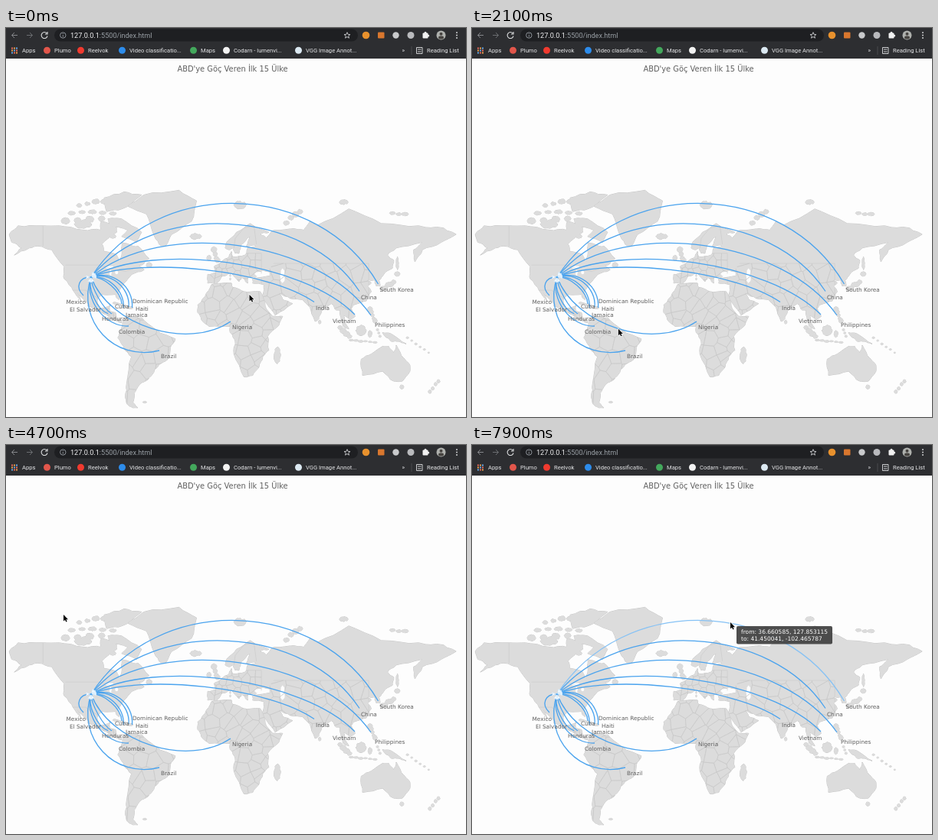
An HTML page with a canvas for the animation above (8 s loop, 600 by 509 pixels).

```html
<!DOCTYPE html>
<html lang="tr">
<head>
<meta charset="utf-8">
<style>
html, body { margin: 0; width: 100%; height: 100%; overflow: hidden; background: #fdfdfd; }
canvas { display: block; width: 600px; height: 509px; }
</style>
</head>
<body>
<canvas id="stage" width="600" height="509"></canvas>
<script>
const W = 600, H = 509, LOOP = 8000, STEP = 100;
const PAPER = '#fdfdfd', LAND = '#dcdcdc', EDGE = '#c5c5c5', BLUE = '#4aa3ee', PALE = '#86c2f5';
const MAP_FONT = '"DejaVu Sans", Verdana, sans-serif', UI_FONT = 'Roboto, sans-serif';
const HUB = { x: 111, y: 326 };
const ctx = document.getElementById('stage').getContext('2d');
const backdrop = document.createElement('canvas');
backdrop.width = W;
backdrop.height = H;
const bg = backdrop.getContext('2d');

function text(c, str, x, y, size, color, font = MAP_FONT, align = 'left') {
  c.font = `${size}px ${font}`;
  c.fillStyle = color;
  c.textAlign = align;
  c.fillText(str, x, y);
}
function disc(c, x, y, r, color) {
  c.fillStyle = color;
  c.beginPath();
  c.arc(x, y, r, 0, 7);
  c.fill();
}
function box(c, x, y, w, h, r, color) {
  c.fillStyle = color;
  c.beginPath();
  c.roundRect(x, y, w, h, r);
  c.fill();
}
function line(c, d, color, width = 1) {
  c.strokeStyle = color;
  c.lineWidth = width;
  c.stroke(new Path2D(d));
}

// Miller projection
function project([lon, lat]) {
  const y = 1.25 * Math.log(Math.tan(Math.PI / 4 + lat * Math.PI / 450)) * 180 / Math.PI;
  return [277.8 + lon * 1.628, 397 - y * 1.628];
}
const parse = s => s.split(',').map(p => p.split(' ').map(Number));
const hash = (a, b) => {
  const v = Math.sin(a * 12.99 + b * 78.23) * 43758.5;
  return v - Math.floor(v) - 0.5;
};
// Splits every coast edge at a randomly shifted midpoint.
const roughen = points => points.flatMap((p, i) => {
  const q = points[(i + 1) % points.length];
  const amp = Math.min(Math.hypot(q[0] - p[0], q[1] - p[1]) * 0.3, 1.4);
  const mx = (p[0] + q[0]) / 2, my = (p[1] + q[1]) / 2;
  return [p, [mx + hash(mx, my) * amp, my + hash(my, mx) * amp * 0.7]];
});
function outline(points, closed = true) {
  const path = new Path2D();
  points.map(project).forEach(([x, y]) => path.lineTo(x, y));
  if (closed) path.closePath();
  return path;
}
const coast = points => outline(roughen(roughen(points)));

const lands = [];
function land(points) {
  const path = coast(parse(points));
  lands.push(path);
  return path;
}
const blob = (lon, lat, rx, ry) => coast(Array.from({ length: 8 }, (_, i) =>
  [lon + rx * Math.cos(i * Math.PI / 4), lat + ry * Math.sin(i * Math.PI / 4)]));
const isle = (...shape) => lands.push(blob(...shape));
function isles(lon0, lat0, lon1, lat1, count, rx, ry) {
  for (let i = 0; i < count; i++) {
    const u = i / (count - 1), size = 1 + hash(i, lon0) * 0.5;
    isle(lon0 + (lon1 - lon0) * u, lat0 + (lat1 - lat0) * u + hash(lat0, i) * ry, rx * size, ry * size);
  }
}

// Keeps the part of a polygon that is nearer to a than to b.
function nearer(poly, a, b) {
  const side = p => (p[0] - a[0]) ** 2 + (p[1] - a[1]) ** 2 - (p[0] - b[0]) ** 2 - (p[1] - b[1]) ** 2;
  return poly.flatMap((p, i) => {
    const q = poly[(i + 1) % poly.length], sp = side(p), sq = side(q), u = sp / (sp - sq);
    const kept = sp <= 0 ? [p] : [];
    if (sp * sq < 0) kept.push([p[0] + (q[0] - p[0]) * u, p[1] + (q[1] - p[1]) * u]);
    return kept;
  });
}
// Divides part of a landmass into random Voronoi countries.
function countries(path, west, south, east, north, size) {
  const sites = [];
  for (let lon = west; lon < east; lon += size)
    for (let lat = south; lat < north; lat += size)
      sites.push([lon + size * (0.5 + hash(lon, lat) * 0.9), lat + size * (0.5 + hash(lat, lon) * 0.9)]);
  const frame = [[west, south], [east, south], [east, north], [west, north]];
  bg.save();
  bg.clip(path);
  for (const a of sites) {
    const cell = sites.reduce((poly, b) => b === a ? poly : nearer(poly, a, b), frame);
    bg.stroke(outline(cell));
  }
  bg.restore();
}

function drawMap() {
  const northAmerica = land('-168 66,-161 70,-141 70,-128 70,-108 68,-95 68,-94 72,-82 69,-82 67,-94 61,-92 57,-82 55,-79 51,-78 58,-78 62,-69 60,-65 60,-56 53,-60 50,-70 47,-65 49,-60 46,-70 43,-76 37,-81 31,-80 25,-83 29,-94 29,-97 26,-97 20,-95 18,-91 19,-87 21,-88 16,-83 15,-83 10,-78 9,-78 7,-86 10,-92 14,-105 20,-106 23,-114 31,-110 23,-117 32,-124 40,-124 48,-134 58,-145 60,-152 59,-164 55,-158 59,-166 62');
  const southAmerica = land('-77 8,-72 12,-62 11,-50 1,-35 -6,-39 -13,-41 -22,-48 -26,-54 -34,-57 -37,-62 -39,-65 -42,-68 -46,-69 -52,-65 -55,-72 -54,-75 -49,-74 -40,-70 -20,-76 -14,-81 -5,-78 3');
  const africa = land('-6 36,10 37,11 34,20 31,33 31,37 20,43 12,51 12,48 5,39 -4,40 -15,35 -20,32 -28,27 -34,20 -35,12 -18,13 -8,9 -1,9 4,-8 4,-13 8,-17 15,-17 21,-10 30');
  const europe = land('60 68.5,44 68,38 64,33 66,40 67,25 71,14 67,6 62,5 59,8 58,11 59,13 56,16 56,18 61,25 65,22 60,30 60,23 59,21 55,11 54,10 57,8 54,2 51,-4 48,-2 44,-9 43,-9 37,-2 37,3 42,10 44,16 38,18 40,13 45,20 40,23 37,23 41,29 41,36 45,62 44');
  const asia = land('58 68.5,68 68,73 72,78 70,104 77,130 71,160 70,180 69,190 66,178 62,163 58,157 51,156 58,163 62,142 59,135 55,140 52,139 47,132 43,128 39,129 35,126 35,125 39,118 39,122 37,119 35,122 31,118 24,108 21,106 18,109 12,105 9,100 13,100 7,104 2,101 3,98 9,97 17,94 17,90 22,82 16,80 10,77 8,73 19,67 25,57 26,48 30,51 25,59 22,45 13,39 21,35 28,36 36,27 37,27 40,41 42,40 46');
  land('114 -22,115 -34,131 -31,140 -38,147 -38,153 -31,152 -25,146 -19,142 -11,140 -17,136 -12,131 -12,122 -18');
  land('-73 78,-60 82,-32 83.5,-18 80,-22 72,-38 66,-43 60,-48 61,-53 67,-58 75');
  land('-89 73,-78 73,-62 67,-66 62,-78 65,-73 68,-88 70');
  land('-90 76,-78 77,-62 82,-76 83,-92 81');
  land('131 -1,138 -2,150 -10,144 -8,138 -8,133 -4');
  // Arctic and Atlantic
  isles(-123, 72.7, -94, 73, 4, 3, 1.2);
  isles(-118, 75.7, -85, 75.4, 5, 3.5, 0.8);
  isles(-112, 78.5, -92, 80, 4, 2.8, 0.8);
  isle(-109, 70.7, 7, 1.8);
  isle(-85, 65, 2.5, 1);
  isle(-56, 49, 2.3, 1.6);
  isle(-18.7, 65, 4.7, 1.4);
  isle(17, 78.5, 5, 1.4);
  isles(54, 71.5, 65, 76, 4, 2.5, 1);
  isle(100, 79.5, 3.5, 0.9);
  isles(139, 75.2, 149, 75, 3, 2.5, 0.6);
  isles(-83.5, 22.3, -75.5, 20.4, 5, 1.3, 0.6);
  isle(-71.3, 18.8, 2.6, 0.8);
  isle(-59.5, -51.7, 1.6, 0.5);
  // Europe and the Indian Ocean
  isles(-1.2, 51.8, -4, 57.5, 4, 2.2, 1.6);
  isle(-8, 53.3, 1.8, 1.6);
  isles(9, 42, 9, 40, 2, 0.6, 0.9);
  isle(46.8, -19, 2.6, 6.5);
  isle(80.7, 7.5, 1, 1.5);
  // Pacific
  isle(143, 50, 0.9, 4);
  isle(142.8, 43.3, 2.2, 1.5);
  isles(131, 33, 140, 38, 5, 1.8, 1.4);
  isles(121, 17, 125, 8, 5, 1.6, 1.6);
  isle(113.8, 0.8, 4.2, 4.2);
  isles(97, 4, 104.5, -4, 4, 2.3, 1.8);
  isles(106, -6.8, 125, -9, 6, 2, 0.7);
  isle(121, -2, 1.6, 2.7);
  isles(127, 1, 129, -3.5, 3, 0.9, 0.8);
  isles(151, -5, 168, -17, 6, 0.9, 0.6);
  isle(146.5, -42, 1.6, 1.4);
  isles(175.8, -38.5, 169, -45.5, 4, 1.5, 1.4);

  bg.lineJoin = 'round';
  bg.strokeStyle = EDGE;
  bg.lineWidth = 1;
  lands.forEach(path => bg.stroke(path));
  bg.fillStyle = LAND;
  lands.forEach(path => bg.fill(path));
  // Black Sea, Caspian and Great Lakes
  bg.fillStyle = PAPER;
  const lakes = [[34, 43.4, 6, 1.8], [51, 42, 2, 5], [-87.5, 47.5, 3.5, 0.8], [-86.8, 44, 0.8, 2], [-82, 44.3, 1.3, 1.3]];
  lakes.forEach(lake => bg.fill(blob(...lake)));

  bg.lineWidth = 0.5;
  const borders = ['-141 60,-141 70', '-123 49,-95 49,-84 46,-75 45,-67 47', '-117 32,-107 32,-97 26', '12 59,13 64,20 69,28 70,30 61'];
  borders.forEach(b => bg.stroke(outline(parse(b), false)));
  countries(northAmerica, -93, 7, -77, 18, 4);
  countries(southAmerica, -82, -56, -34, 13, 11);
  countries(africa, -18, -35, 52, 37, 8.5);
  countries(europe, -10, 36, 34, 56, 5.5);
  countries(asia, 34, 8, 120, 50, 10);
}

function drawBrowser() {
  const pale = '#dfe0e2', grey = '#9aa0a6';
  box(bg, 0, 0, W, 40, 0, '#2d2e31');
  box(bg, 63, 1.5, 396, 16, 8, '#1e1f22');
  line(bg, 'M15 9.5H7.5M11 6L7.5 9.5L11 13', '#85878b');
  line(bg, 'M27 9.5H34.5M31 6L34.5 9.5L31 13', '#6b6d71');
  line(bg, 'M53.2 7A4 4 0 1 0 54 10.5M54 5V8H51', pale, 1.1);
  line(bg, 'M78 9.5A3.7 3.7 0 1 0 70.6 9.5A3.7 3.7 0 1 0 78 9.5M74.3 9V11.7M74.3 7V8', grey, 0.9);
  text(bg, '127.0.0.1', 84, 12.8, 9.1, '#f1f1f2', UI_FONT);
  text(bg, ':5500/index.html', 84 + bg.measureText('127.0.0.1').width, 12.8, 9.1, grey, UI_FONT);
  bg.beginPath();
  for (let i = 0; i < 10; i++) {
    const r = i % 2 ? 1.8 : 4.2, a = i * Math.PI / 5;
    bg.lineTo(445 + r * Math.sin(a), 9.8 - r * Math.cos(a));
  }
  bg.closePath();
  bg.strokeStyle = pale;
  bg.lineWidth = 0.8;
  bg.stroke();
  disc(bg, 469.5, 9.5, 4.8, '#e8912d');
  box(bg, 485, 5.5, 8.5, 8, 1, '#d9772e');
  disc(bg, 508.5, 9.5, 4.2, '#c9cacc');
  disc(bg, 528, 9.5, 4.5, '#b9babd');
  box(bg, 543.5, 6.5, 7, 7, 1, '#f1f1f1');
  disc(bg, 547, 6.3, 1.5, '#f1f1f1');
  disc(bg, 550.7, 10, 1.5, '#f1f1f1');
  disc(bg, 567.5, 9.5, 6, '#aeb0ad');
  disc(bg, 567.5, 7.8, 2, '#45423f');
  box(bg, 564, 10.4, 7, 4, 2, '#45423f');
  for (const y of [6, 9.5, 13]) disc(bg, 588, y, 0.9, pale);

  const dots = ['#e8695d', '#eda04a', '#62a8e6'];
  for (let i = 0; i < 9; i++) {
    const row = Math.floor(i / 3);
    box(bg, 7 + i % 3 * 3, 25.5 + row * 3, 2, 2, 0, dots[(i + row) % 3]);
  }
  const marks = [['Apps', 21], ['Plumo', 63, '#e2564b'], ['Reelvok', 107, '#f03a2f'], ['Video classificatio...', 161, '#2d8ceb'],
    ['Maps', 254, '#43a85c'], ['Codarn - lumenvi...', 297, '#f3f3f3'], ['VGG Image Annot...', 391, '#dce9f2'],
    ['»', 516.5], ['Reading List', 549]];
  for (const [name, x, color] of marks) {
    if (color) disc(bg, x - 9.5, 29.3, 4.5, color);
    text(bg, name, x, 32, 7.6, '#e6e7e9', UI_FONT);
  }
  line(bg, 'M529 24V35', '#57585c', 0.7);
  line(bg, 'M535.5 25.5H543V33.5H535.5ZM537 28H541.5M537 31H541.5', pale, 0.9);
}

// Cubic arc from the hub whose middle stands `bulge` off the chord
function route(name, x, y, bulge, [labelX, labelY] = [2, 10], centre) {
  const dx = x - HUB.x, dy = y - HUB.y, chord = Math.hypot(dx, dy), lift = bulge * 4 / 3 / chord, inset = 0.22;
  const control = u => `${HUB.x + dx * u + dy * lift} ${HUB.y + dy * u - dx * lift}`;
  return {
    name, centre, labelX: x + labelX, labelY: y + labelY,
    path: new Path2D(`M${HUB.x} ${HUB.y}C${control(inset)} ${control(1 - inset)} ${x} ${y}`),
    angle: Math.atan2(dy, dx) - Math.atan(lift / inset),
  };
}
const routes = [
  route('Mexico', 101, 350, -11, [-22.5, 10.5]),
  route('El Salvador', 133, 374, -8, [-50, -3.5]),
  route('Honduras', 138, 374, -5, [-13, 9]),
  route('Cuba', 151, 361, 9, [-9, 6]),
  route('Jamaica', 153, 366, 13, [3, 12]),
  route('Haiti', 160, 365, 16, [9, 4.5]),
  route('Dominican Republic', 164.5, 366, 18, [0.5, -6]),
  route('Colombia', 160, 390, -19, [-13, 10], '4.146765, -72.612004'),
  route('Brazil', 200, 422, -40, undefined, '-15.83476, -47.80213'),
  route('Nigeria', 293, 384, -40),
  route('India', 402, 358.5, 26, undefined, '23.313107, 76.30531'),
  route('Vietnam', 455, 375, 44, [-29, 11]),
  route('Philippines', 476, 376, 67, [5, 15]),
  route('China', 461, 344.5, 79, undefined, '31.513264, 112.50317'),
  route('South Korea', 485.5, 335, 101, undefined, '36.660585, 127.853115'),
];

// time, x, y of the pointer tip
const pointer = [
  [0, 317.5, 349], [600, 319, 335], [1400, 321.5, 226], [2300, 172, 418], [2800, 183.5, 392],
  [4700, 75, 222], [5700, 395, 351.5], [6700, 391.5, 273], [6900, 391.5, 273], [7900, 337, 232], [8000, 337, 232],
];
// start, end, route, tooltip offset from the pointer
const hovers = [
  [1200, 1600, 'South Korea', 7.5, 6], [2200, 2500, 'Brazil', 7, 0], [2700, 3000, 'Colombia', -1, 9.5],
  [5600, 5900, 'India', 4, 7.5], [6300, 6600, 'China', 7, 6], [7700, 8000, 'South Korea', 8, 5],
];

function pointerAt(t) {
  const i = pointer.findIndex(k => k[0] > t);
  const [t0, x0, y0] = pointer[i - 1], [t1, x1, y1] = pointer[i];
  const u = (t - t0) / (t1 - t0), e = u * u * (3 - 2 * u);
  return [x0 + (x1 - x0) * e, y0 + (y1 - y0) * e];
}
function drawArrowhead({ angle }) {
  ctx.save();
  ctx.translate(HUB.x, HUB.y);
  ctx.rotate(angle);
  const head = new Path2D('M1.5 0L6.5 -1.9L5.6 0L6.5 1.9Z');
  ctx.fillStyle = '#fff';
  ctx.fill(head);
  ctx.strokeStyle = '#d8ecfc';
  ctx.lineWidth = 0.7;
  ctx.stroke(head);
  ctx.restore();
}
function drawTooltip(centre, x, y) {
  const rows = [`from: ${centre}`, 'to: 41.450041, -102.465787'];
  ctx.font = `7.5px ${MAP_FONT}`;
  const width = Math.max(...rows.map(row => ctx.measureText(row).width)) + 12;
  box(ctx, x, y, width, 23.5, 2, 'rgba(65,65,65,.93)');
  rows.forEach((row, i) => text(ctx, row, x + 6, y + 10.3 + i * 8.7, 7.5, '#fff'));
}
function drawPointer(x, y) {
  ctx.save();
  ctx.translate(x, y);
  const shape = new Path2D('M0 0V8.5L2 6.8L3.3 9.6L4.7 9L3.4 6.3H6Z');
  ctx.strokeStyle = '#fff';
  ctx.lineWidth = 1.2;
  ctx.stroke(shape);
  ctx.fillStyle = '#000';
  ctx.fill(shape);
  ctx.restore();
}

function draw(t) {
  const [x, y] = pointerAt(t);
  const hover = hovers.find(h => t >= h[0] && t < h[1]);
  const active = hover && routes.find(r => r.name === hover[2]);
  ctx.drawImage(backdrop, 0, 0);
  ctx.lineWidth = 1.3;
  for (const r of routes) {
    ctx.strokeStyle = r === active ? PALE : BLUE;
    ctx.stroke(r.path);
  }
  routes.forEach(drawArrowhead);
  for (const r of routes) text(ctx, r.name, r.labelX, r.labelY, 7.3, '#5f5f5f');
  if (active) drawTooltip(active.centre, x + hover[3], y + hover[4]);
  drawPointer(x, y);
}

box(bg, 0, 0, W, H, 0, PAPER);
drawMap();
drawBrowser();
text(bg, "ABD'ye Göç Veren İlk 15 Ülke", 295.5, 56.5, 9.9, '#606060', MAP_FONT, 'center');

const start = performance.now();
function frame() {
  const t = (performance.now() - start) % LOOP;
  draw(Math.floor(t / STEP) * STEP);
  requestAnimationFrame(frame);
}
frame();
</script>
</body>
</html>
```
